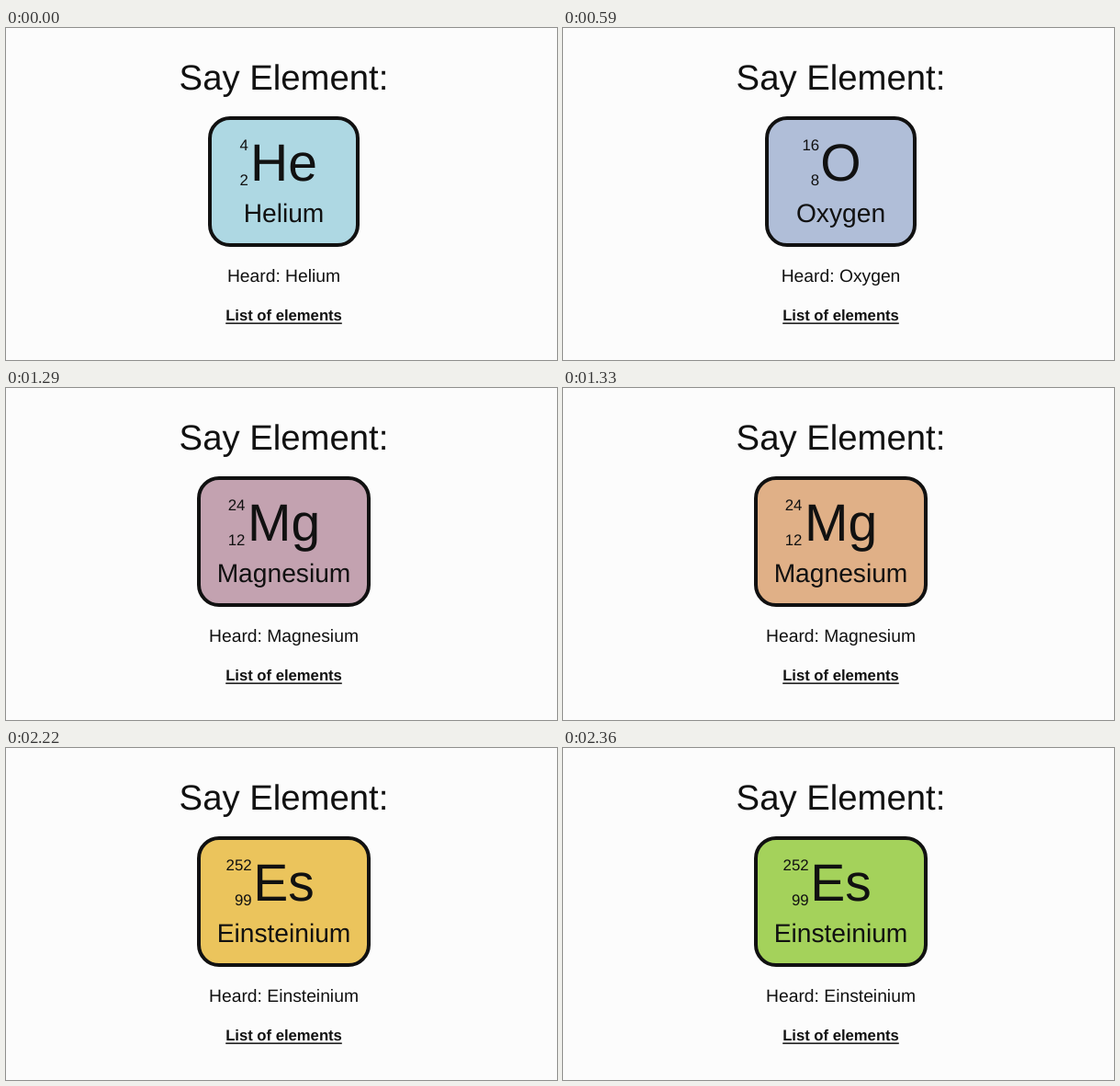
These frames come from a looping animation (600 px wide and 361 px high, 3010 ms). An HTML page:

```html
<!DOCTYPE html>
<html lang="en">
<head>
<meta charset="utf-8">
<title>Say Element</title>
<style>
  html, body { margin: 0; width: 100%; height: 100%; overflow: hidden; background: #fcfcfc; }
  svg { display: block; width: 600px; height: 361px; }
  text {
    font-family: "Liberation Sans", Arial, sans-serif;
    fill: #111;
    text-anchor: middle;
    text-rendering: geometricPrecision;
  }
  .title { font-size: 38.3px; }
  .symbol { font-size: 57px; }
  .name { font-size: 28.2px; }
  .num { font-size: 16.8px; text-anchor: end; }
  .heard { font-size: 19.3px; }
  .link { font-size: 16.65px; font-weight: bold; }
</style>
</head>
<body>
<svg viewBox="0 0 600 361">
  <text class="title" x="302.5" y="67">Say Element:</text>
  <rect id="card" y="98" height="138" rx="22" stroke="#111" stroke-width="4"/>
  <text class="num" id="mass" y="133"></text>
  <text class="num" id="number" y="171"></text>
  <text class="symbol" id="symbol" x="302.5" y="166"></text>
  <text class="name" id="name" x="302.5" y="211"></text>
  <text class="heard" id="heard" x="302.5" y="276"></text>
  <text class="link" x="302.5" y="318">List of elements</text>
  <rect x="239.2" y="320.4" width="126.6" height="1.5" fill="#111"/>
</svg>
<script>
  const LOOP = 3010;
  const CENTER = 302.5;
  const FADE = [[0, 0.22], [40, 0.6], [90, 0.87], [140, 1]];

  // numX is the right edge of the mass and atomic numbers
  const elements = [
    { at: 0, symbol: "He", name: "Helium", mass: 4, number: 2, numX: 263.8, width: 161,
      color: [174, 216, 227], fade: [[0, 1]] },
    { at: 540, symbol: "O", name: "Oxygen", mass: 16, number: 8, numX: 279.2, width: 161,
      color: [178, 153, 200], fade: [[0, 0], [50, 0.41], [100, 0.77], [140, 0.93], [190, 1]] },
    { at: 1290, symbol: "Mg", name: "Magnesium", mass: 24, number: 12, numX: 260.4, width: 185,
      color: [255, 192, 92], fade: FADE },
    { at: 2220, symbol: "Es", name: "Einsteinium", mass: 252, number: 99, numX: 267.6, width: 185,
      color: [164, 210, 91], fade: FADE }
  ];

  const $ = id => document.getElementById(id);
  const card = $("card");
  let shown = -1;

  function show(i) {
    if (i === shown) return;
    shown = i;
    const el = elements[i];
    for (const key of ["symbol", "name", "mass", "number"]) $(key).textContent = el[key];
    $("heard").textContent = "Heard: " + el.name;
    $("mass").setAttribute("x", el.numX);
    $("number").setAttribute("x", el.numX);
    card.setAttribute("x", CENTER - el.width / 2);
    card.setAttribute("width", el.width);
  }

  function draw(t) {
    const i = elements.findLastIndex(el => t >= el.at);
    const el = elements[i];
    const from = elements[Math.max(0, i - 1)].color;
    const p = el.fade.findLast(step => t - el.at >= step[0])[1];
    show(i);
    card.setAttribute("fill", `rgb(${el.color.map((c, k) => Math.round(from[k] + (c - from[k]) * p))})`);
  }

  const start = performance.now();
  function tick() {
    draw((performance.now() - start) % LOOP);
    requestAnimationFrame(tick);
  }
  tick();
</script>
</body>
</html>
```
